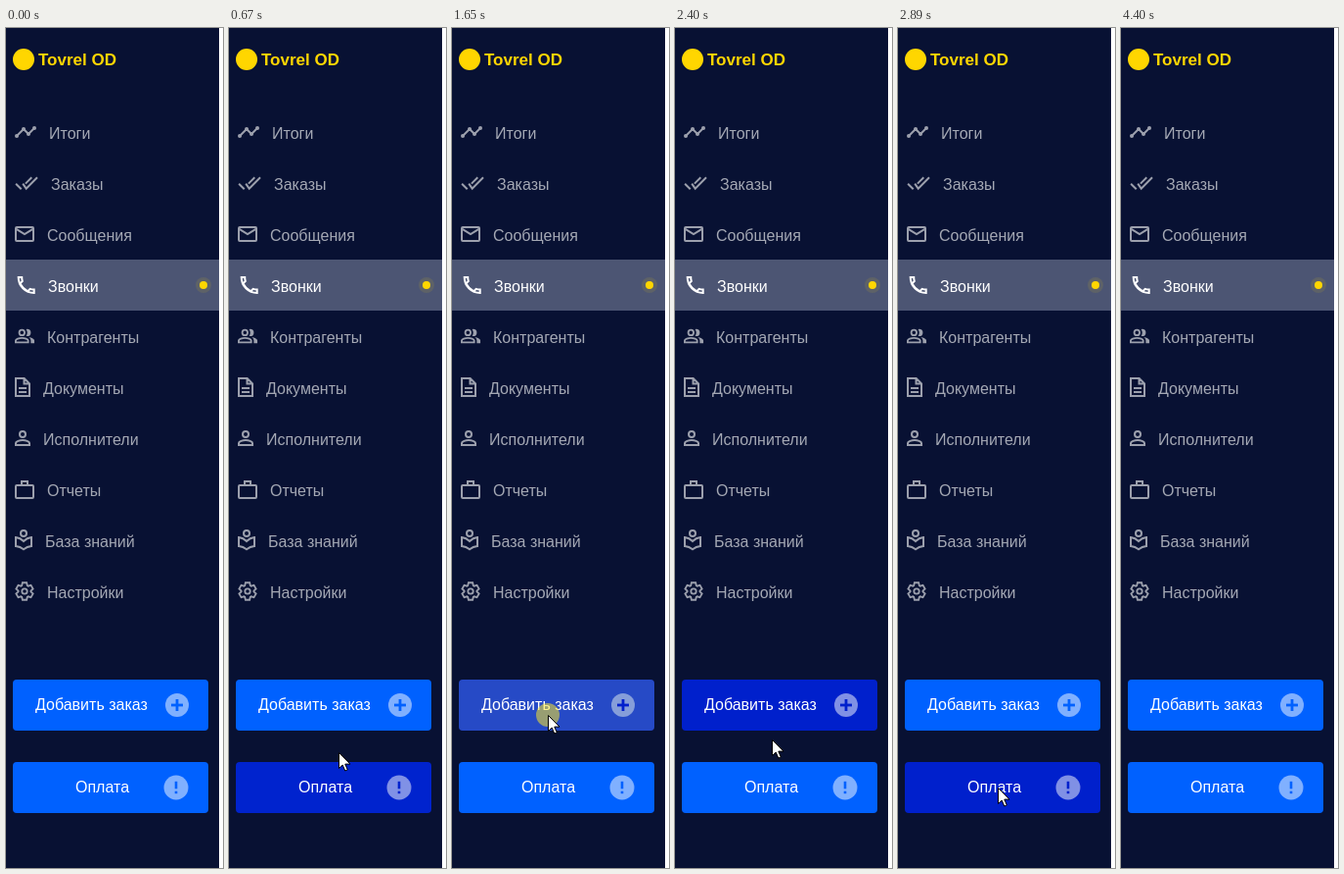
These frames come from a looping animation (222 by 856 pixels, 4670 ms). An HTML page with a canvas:

```html
<!DOCTYPE html>
<html lang="ru">
<head>
<meta charset="utf-8">
<title>Меню</title>
<style>
  html, body { margin: 0; width: 100%; height: 100%; overflow: hidden; background: #fff; }
  canvas, svg { position: absolute; left: 0; top: 0; width: 222px; height: 856px; }
  text { font: 16px "Liberation Sans", Arial, sans-serif; fill: #a4a8b4; }
  text.on { fill: #fff; }
  text.brand { font-size: 17px; font-weight: bold; fill: #ffd600; }
</style>
</head>
<body>
<canvas id="base" width="222" height="856"></canvas>
<svg id="labels" viewBox="0 0 222 856"></svg>
<canvas id="over" width="222" height="856"></canvas>
<script>
const LOOP = 4670, STEP = 70, ROW = 52;
const GREY = '#9ca0ad', YELLOW = '#ffd600';
const base = document.getElementById('base').getContext('2d');
const over = document.getElementById('over').getContext('2d');
const labels = document.getElementById('labels');

// Progress 0..1 that advances in whole steps, then slows by power q
function progress(t, from, length, q = 2) {
  const passed = Math.floor((t - from) / STEP + 1e-6) * STEP;
  return 1 - (1 - Math.max(0, Math.min(1, passed / length))) ** q;
}

// Drawing helpers
function disc(c, x, y, r, color) {
  c.fillStyle = color;
  c.beginPath();
  c.arc(x, y, r, 0, Math.PI * 2);
  c.fill();
}

function ring(c, x, y, r) {
  c.beginPath();
  c.arc(x, y, r, 0, Math.PI * 2);
  c.stroke();
}

function box(c, x, y, w, h, r = 1) {
  c.beginPath();
  c.roundRect(x, y, w, h, r);
  c.stroke();
}

const line = (c, d) => c.stroke(new Path2D(d));

function bust(c, x) {
  ring(c, x, 8, 3);
  line(c, `M${x - 7} 19v-2c0-1.6 4-3 7-3s7 1.4 7 3v2z`);
}

// Icons on a 24 px grid
function chart(c) {
  line(c, 'M3 16L10 9L15 14L21 8');
  for (const [x, y] of [[3, 16], [10, 9], [15, 14], [21, 8]]) disc(c, x, y, 2, GREY);
}

function checks(c) {
  line(c, 'M1.1 12.7L6.7 18.3M8.2 12.7L11.7 17.6L23 6.3M17.3 6.3L10.9 12.6');
}

function mail(c) {
  box(c, 3, 5, 18, 14);
  line(c, 'M3.5 6.8L12 12L20.5 6.8');
}

function phone(c) {
  c.strokeStyle = '#fff';
  c.translate(1.2, 0);
  line(c, 'M4 4H7.5Q7.5 6 8.1 8L5.7 10.4Q8.5 15.6 13.6 18.3L16 15.9Q18 16.5 20 16.5V20C11 20 4 13 4 4z');
}

function people(c) {
  c.translate(1.1, 1.1);
  c.scale(.91, .91);
  bust(c, 9);
  c.fill(new Path2D('M16.7 13.1C18 14 19 15.3 19 17V20H23V17C23 14.8 19.4 13.5 16.7 13.1zM15 12A4 4 0 0 0 15 4L13.7 4.2Q15 5.9 15 8T13.7 11.8z'));
}

function sheet(c) {
  line(c, 'M5 3H13.6L19 8.4V21H5zM13.5 3V8.5H19M8 13H16M8 17H16');
}

function bag(c) {
  box(c, 3, 8, 18, 13);
  line(c, 'M9 8V4H15V8');
}

function reader(c) {
  ring(c, 12, 5, 3);
  line(c, 'M12 13Q8.6 9.7 4 9.1V18Q8.5 18.5 12 21.2Q15.5 18.5 20 18V9.1Q15.4 9.7 12 13z');
}

function gear(c) {
  c.lineWidth = 1.8;
  c.beginPath();
  for (let k = 0; k < 24; k++) {
    const tip = k % 4 === 1 || k % 4 === 2;
    const a = Math.floor(k / 4) * Math.PI / 3 + Math.PI / 2 + (k % 4 < 2 ? -1 : 1) * (tip ? .24 : .45);
    const r = tip ? 9 : 6.4;
    c.lineTo(12 + r * Math.cos(a), 12 + r * Math.sin(a));
  }
  c.closePath();
  c.stroke();
  ring(c, 12, 12, 2.7);
}

// Text, icon, icon width
const menu = [
  ['Итоги', chart, 22], ['Заказы', checks, 24], ['Сообщения', mail, 20], ['Звонки', phone, 21],
  ['Контрагенты', people, 20], ['Документы', sheet, 16], ['Исполнители', c => bust(c, 12), 16],
  ['Отчеты', bag, 20], ['База знаний', reader, 18], ['Настройки', gear, 20]
];

function plus(c) {
  c.fillRect(-6, -1.4, 12, 2.8);
  c.fillRect(-1.4, -6, 2.8, 12);
}

function bang(c) {
  c.fillRect(-1.3, -6.2, 2.6, 7.5);
  c.fillRect(-1.3, 3.7, 2.6, 2.5);
}

const buttons = [
  { y: 664, x: 175, r: 12, sign: plus, hover: [[810, 2400]], down: 1360, up: 1980, press: [98, 700] },
  { y: 748, x: 174, r: 12.5, sign: bang, hover: [[390, 670], [2540, 4050]], down: 3090, up: 3700, press: [102, 774] }
];

// Pointer legs: start, length, easing power, from, to
const legs = [
  [320, 700, 1.75, [145, 827], [98, 700]],
  [2190, 700, 1.15, [98, 700], [102, 774]],
  [3910, 420, .55, [102, 774], [103, 860]]
];

const arrow = new Path2D('M.5 .5V16.5L4.2 13L6.8 19L9.3 17.9L6.8 12.1H12z');

function label(str, x, y, cls = '') {
  const el = document.createElementNS('http://www.w3.org/2000/svg', 'text');
  el.setAttribute('x', x);
  el.setAttribute('y', y);
  el.setAttribute('class', cls);
  el.textContent = str;
  labels.append(el);
}

label('Tovrel OD', 33, 38, 'brand');
menu.forEach(([str, icon, w], i) => label(str, 22 + w, 113 + ROW * i, icon === phone ? 'on' : ''));
label('Добавить заказ', 30, 695, 'on');
label('Оплата', 71, 779, 'on');

function drawMenu(c) {
  menu.forEach(([, icon, w], i) => {
    c.save();
    c.translate(w / 2 - 3, 94 + ROW * i);
    c.fillStyle = c.strokeStyle = GREY;
    c.lineWidth = 2;
    icon(c);
    c.restore();
  });
}

function drawButton(c, b, t) {
  let h = 0;
  for (const [on, off] of b.hover) h += progress(t, on, 350) - progress(t, off, 350);
  const color = `rgb(0,${Math.round(97 - 65 * h)},${Math.round(255 - 51 * h)})`;
  c.save();
  c.beginPath();
  c.roundRect(7, b.y, 200, 52, 4);
  c.fillStyle = color;
  c.fill();
  c.clip();
  disc(c, b.x, b.y + 26, b.r, 'rgba(255,255,255,.5)');
  if (t >= b.down) {
    const size = 150 * progress(t, b.down - STEP, 5 * STEP);
    const fade = 1 - progress(t, b.up - STEP, 3 * STEP, 1);
    disc(c, ...b.press, size, `rgba(150,200,180,${.25 * fade})`);
  }
  c.translate(b.x, b.y + 26);
  c.fillStyle = color;
  b.sign(c);
  c.restore();
}

function drawBase(c, t) {
  c.clearRect(0, 0, 222, 856);
  c.fillStyle = '#081133';
  c.fillRect(0, 0, 218, 856);
  disc(c, 18, 32, 11, YELLOW);
  c.fillStyle = '#4c5573';
  c.fillRect(0, 236, 218, ROW);
  disc(c, 202, 262, 8, 'rgba(255,214,0,.1)');
  disc(c, 202, 262, 4, YELLOW);
  drawMenu(c);
  buttons.forEach(b => drawButton(c, b, t));
}

function drawPointer(c, t) {
  c.clearRect(0, 0, 222, 856);
  for (const b of buttons) {
    if (t >= b.down && t < b.up) disc(c, ...b.press, 12, 'rgba(255,235,40,.53)');
  }
  const leg = legs.findLast(l => l[0] <= t);
  if (!leg) return;
  const [start, length, q, from, to] = leg;
  const p = progress(t, start, length, q);
  c.save();
  c.translate(...from.map((v, i) => Math.round(v + (to[i] - v) * p)));
  c.fillStyle = '#fff';
  c.strokeStyle = '#000';
  c.fill(arrow);
  c.stroke(arrow);
  c.restore();
}

const start = performance.now();
function frame() {
  const t = (performance.now() - start) % LOOP;
  drawBase(base, t);
  drawPointer(over, t);
  requestAnimationFrame(frame);
}
frame();
</script>
</body>
</html>
```
